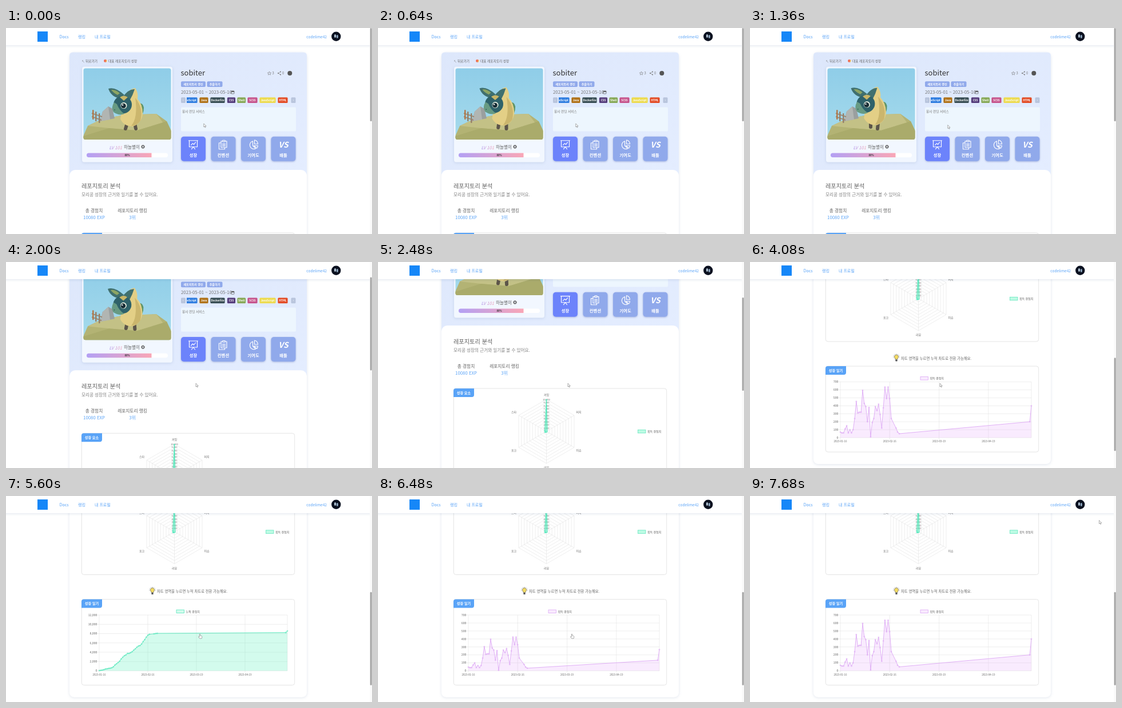
Write an HTML page that moves like this. It is 640 px wide and 360 px high and loops after 7.76 s.

```html
<!DOCTYPE html>
<html lang="ko">
<head>
<meta charset="utf-8">
<style>
html, body { margin: 0; width: 100%; height: 100%; overflow: hidden; background: #fff; }
svg { display: block; width: 640px; height: 360px; font-family: 'Noto Sans CJK KR', 'Noto Sans CJK', 'Noto Sans', sans-serif; font-weight: 300; }
.shadow { filter: drop-shadow(0 1px 2.5px rgba(70, 100, 150, .17)); }
.press { filter: drop-shadow(0 1px 1.5px rgba(60, 80, 160, .35)); }
.line { fill: none; stroke: #fff; stroke-width: 1.15; stroke-linejoin: round; stroke-linecap: round; }
</style>
</head>
<body>
<svg id="stage" viewBox="0 0 640 360"></svg>
<script>
const LOOP = 7760, FRAME = 80;
const BLUE = '#59a3f7', INK = '#606060', GRID = '#e2e2e2';

const rect = (x, y, w, h, r, fill, more = '') =>
  `<rect x="${x}" y="${y}" width="${w}" height="${h}" rx="${r}" fill="${fill}" ${more}/>`;
const text = (x, y, size, str, fill = INK, more = '') =>
  `<text x="${x}" y="${y}" font-size="${size}" fill="${fill}" ${more}>${str}</text>`;
const path = (d, fill, more = '') => `<path d="${d}" fill="${fill}" ${more}/>`;
const dot = (x, y, r, fill, more = '') => `<circle cx="${x}" cy="${y}" r="${r}" fill="${fill}" ${more}/>`;
const line = (x1, y1, x2, y2, color = GRID, w = .6) =>
  `<path d="M${x1} ${y1}L${x2} ${y2}" stroke="${color}" stroke-width="${w}" fill="none"/>`;
const MID = 'text-anchor="middle"', END = 'text-anchor="end"', BOLD = 'font-weight="700"';

const defs = `<defs>
  <linearGradient id="bar"><stop stop-color="#b3a0f4"/><stop offset="1" stop-color="#f9a6b6"/></linearGradient>
  <linearGradient id="lv"><stop stop-color="#a68bea"/><stop offset="1" stop-color="#f2a0b4"/></linearGradient>
  <linearGradient id="sky" x2="0" y2="1"><stop stop-color="#8fcde8"/><stop offset="1" stop-color="#a6dbec"/></linearGradient>
  <linearGradient id="top" x2="1" y2="1"><stop stop-color="#dde7fb"/><stop offset="1" stop-color="#e4edff"/></linearGradient>
  <clipPath id="photo"><rect x="135.500" y="70.500" width="153" height="124.500" rx="3.500"/></clipPath>
  <clipPath id="tags"><rect x="316" y="119" width="180" height="14"/></clipPath>
</defs>`;

function petScene() {
  const fence = [151, 156, 162].map((x, i) => rect(x, 143 + i * 3, 2.5, 17, 1, i ? '#97816a' : '#b07a4e')).join('');
  return `<g clip-path="url(#photo)">
    ${rect(135, 70, 154, 126, 0, 'url(#sky)')}
    ${path('M135 189L143 171 166 160 205 152 263 150 281 163 289 180V196H135Z', '#b3b374')}
    ${path('M143 171L166 160 205 152 263 150 275 166 229 179 180 175Z', '#c3c186')}
    ${path('M135 189L180 175 229 179 281 163 289 180V196H135Z', '#aaab6b')}
    ${path('M164 163L169 146 179 137 186 141 190 158Z', '#9a9f9f')}${path('M169 146L179 137 182 160 164 163Z', '#b1b5b2')}
    ${line(150, 149, 168, 155, '#9b7c61', 1.6)}${line(150, 155, 167, 161, '#9b7c61', 1.6)}${fence}
    <path id="legs" stroke="#5d5549" stroke-width="6" stroke-linecap="round" fill="none"/>
    <g id="pet">
      ${path('M229 134Q238 126 241 138 241 150 233 157Z', '#5f9468')}
      ${path('M207 119Q217 104 226 104 232 113 230 123 239 132 239 149 237 166 222 171 206 171 200 158Z', '#e3cf86')}
      ${path('M226 121Q241 140 235 161 229 170 219 170 231 156 226 121Z', '#cbb66d')}
      ${path('M203 121Q214 105 225 106 222 116 216 126Z', '#40706f')}
      ${path('M200 122Q184 120 179 105 191 101 207 116Z', '#40706f')}
      ${path('M195 116Q187 112 184 107 192 106 199 113Z', '#8da564')}
      <ellipse cx="204" cy="133" rx="16" ry="15.500" fill="#2f626a"/>
      ${path('M189 129Q183 138 188 146 198 153 207 149 198 143 194 132Z', '#679a83')}
      ${path('M199 120Q206 115 213 120L206 126Z', '#c9b667')}
      ${dot(206, 134.500, 5.500, '#e9f1e4')}${dot(205.500, 135, 4.300, '#172d36')}${dot(204, 133.500, 1.200, '#fff')}
      ${dot(190, 142, .8, '#254950')}
    </g>
  </g>`;
}

function bigButton(x, label, fill, icon) {
  return rect(x, 189.7, 43, 43, 5, fill, 'class="press"') +
    `<g transform="translate(${x + 21.5} 203.7)" class="line">${icon}</g>` +
    text(x + 21.5, 225.2, 7.4, label, '#fff', `${MID} ${BOLD}`);
}

function profile() {
  const tags = [
    ['TypeScript', 306, 29, '#2f7de0'], ['Java', 338, 16, '#b07219'], ['Dockerfile', 357, 26, '#384d54'],
    ['CSS', 386.500, 15, '#563d7c'], ['Shell', 404, 15.500, '#87a957'], ['SCSS', 422, 18, '#c6538c'],
    ['JavaScript', 443, 29, '#eddb4f'], ['HTML', 475, 18, '#e34c26']
  ].map(([name, x, w, c]) => rect(x + .4, 121.3, w - .8, 9.7, 1.5, c) + text(x + w / 2, 127.900, 4.6, name, '#fff', `${MID} ${BOLD}`)).join('');
  const soft = '#90a9eb';
  return path('M111 262V48.500Q111 42.500 117 42.500H520Q526 42.500 526 48.500V262Z', 'url(#top)') +
    text(132.500, 60, 5, '↖', '#777') + text(139, 60, 5.7, '뒤로가기') +
    dot(173.500, 57.500, 2.4, '#ee6b52') + path('M171 55L174 58 177 55 176 60Z', '#f4c95c') +
    text(179, 60, 5.7, '대표 레포지토리 성장') +
    rect(133, 67.500, 158, 167, 4, '#f2f7ff', 'class="shadow"') + petScene() +
    text(180.500, 212, 7.5, 'LV 101', 'url(#lv)', 'font-style="italic"') + text(206, 210.500, 7.6, '하늘별이') +
    dot(239.500, 207.500, 2, 'none', 'stroke="#666" stroke-width="1.4"') +
    dot(239.500, 207.500, 3, 'none', 'stroke="#666" stroke-width=".9" stroke-dasharray="1.2 1.156"') +
    rect(141, 218.500, 142, 7.5, 3.7, '#fff') + path('M144.700 218.500H254.500V226H144.700A3.700 3.700 0 0 1 144.700 218.500Z', 'url(#bar)') +
    text(212, 223.800, 4.2, '80%', '#333', `${MID} ${BOLD}`) +
    text(305.500, 82.500, 13, 'sobiter', '#333', 'font-weight="400"') +
    path('M460.500 76L461.400 78.200 463.700 78.300 461.900 79.800 462.500 82 460.500 80.800 458.500 82 459.100 79.800 457.300 78.300 459.600 78.200Z', 'none', 'stroke="#777" stroke-width=".6"') +
    text(465.500, 81.300, 5.8, '3', '#777') +
    line(476, 79, 480, 76.500, '#777') + line(476, 79, 480, 81.500, '#777') +
    dot(476, 79, 1, '#777') + dot(480, 76.500, 1, '#777') + dot(480, 81.500, 1, '#777') +
    text(483, 81.300, 5.8, '0', '#777') + dot(496.300, 79, 4, '#555') +
    rect(306, 93.3, 43, 9.7, 2, soft) + text(327.500, 100, 5.1, '레포지토리 갱신', '#fff', `${MID} ${BOLD}`) +
    rect(351.500, 93.3, 27, 9.7, 2, soft) + text(365, 100, 5.1, '추출하기', '#fff', `${MID} ${BOLD}`) +
    text(306, 115, 7.8, '2023-05-01 ~ 2023-05-16', '#777') +
    rect(394, 110, 5, 5, .7, 'none', 'stroke="#555" stroke-width=".7"') + rect(394, 110, 5, 1.8, 0, '#555') +
    rect(306, 121.3, 8, 9.7, 1.5, '#b9c5dd') + text(310, 127.900, 6, '‹', '#fff', MID) +
    rect(498.500, 121.3, 8, 9.7, 1.5, '#b9c5dd') + text(502.500, 127.900, 6, '›', '#fff', MID) +
    `<g clip-path="url(#tags)">${tags}</g>` +
    rect(306, 138.500, 201, 42, 2, '#edf6fe') + text(308, 147.500, 5.7, '봉사 펀딩 서비스', '#777') +
    bigButton(306, '성장', '#6c83fb', '<path d="M-8-7H8M-7-7V4H7V-7M-3 8L0 4 3 8M-4 1L-1-2 1 0 4-4"/>') +
    bigButton(358.500, '컨벤션', soft, '<path d="M-4-6H-1M3-6H6V5H-4V-6M-1-7.500H3V-5H-1ZM-4-3H-7.500V8H2.500V5M-1.500-1.500H3.500M-1.500.500H3.500M-1.500 2.500H3.500"/>') +
    bigButton(411, '기여도', soft, '<path d="M-1-6A7 7 0 1 0 4 7L-1 2ZM2-8A7 7 0 0 1 8-1H2ZM1 2H8A7 7 0 0 1 6 6.500Z"/>') +
    bigButton(463.500, '배틀', soft, text(0, 5, 13.800, 'VS', '#fff', `${MID} ${BOLD} font-style="italic" stroke="none"`));
}

function box(y, title) {
  return rect(132.300, y, 372.400, 150, 4, '#fff', 'stroke="#dedede" stroke-width=".8"') +
    path(`M132 ${y + 15}V${y + 4}Q132 ${y} 136 ${y}H168V${y + 11}Q168 ${y + 15} 164 ${y + 15}Z`, BLUE) +
    text(150, y + 9.800, 6.2, title, '#fff', `${MID} ${BOLD}`);
}

function legend(x, y, label, fill, stroke) {
  return rect(x, y, 13.500, 5.6, 0, fill, `stroke="${stroke}" stroke-width=".8"`) + text(x + 16.500, y + 4.700, 5, label);
}

function radar() {
  const cx = 294.5, cy = 433, R = 56;
  const at = (i, r) => [cx + r * Math.sin(i * Math.PI / 3), cy - r * Math.cos(i * Math.PI / 3)].map(v => v.toFixed(2));
  const hex = sizes => 'M' + sizes.map((r, i) => at(i, r)).join('L') + 'Z';
  let s = '';
  for (let k = 1; k <= 10; k++) s += path(hex(Array(6).fill(k * R / 10)), 'none', `stroke="${GRID}" stroke-width=".6"`);
  for (let i = 0; i < 6; i++) s += line(cx, cy, ...at(i, R));
  for (let k = 1; k <= 10; k++) {
    const y = cy - k * R / 10;
    s += rect(cx - 6, y - 2, 12, 4, 0, '#fff', 'opacity=".7"') + text(cx, y + 1.500, 4.1, (k * 1000).toLocaleString('en'), '#666', MID);
  }
  s += path(hex([55, 1.5, 1.5, 1.5, 3, 3]), 'rgba(80,240,185,.45)', 'stroke="#58e8bd" stroke-width="1.3"');
  s += dot(...at(0, 55), 1.3, '#58e8bd') + dot(...at(4, 2.5), 1.3, '#58e8bd') + dot(...at(5, 3), 1.3, '#58e8bd');
  const labels = [['커밋', 294.5, 371], ['머지', 351, 401], ['이슈', 351, 468], ['리뷰', 294.5, 498], ['포크', 237.5, 468], ['스타', 237.5, 401]];
  return s + labels.map(([l, x, y]) => text(x, y, 5, l, '#666', MID)).join('');
}

function analysis() {
  const rays = [0, 1, 2, 3, 4, 5, 6].map(i => {
    const a = Math.PI * (1 + i / 6), c = Math.cos(a), n = Math.sin(a);
    return line(256 + 4.5 * c, 535 + 4.5 * n, 256 + 5.7 * c, 535 + 5.7 * n, '#777', .7);
  }).join('');
  return rect(111, 248, 415, 474, 10, '#fff') +
    text(132, 280, 10.2, '레포지토리 분석') + text(132, 293.500, 7.6, '모리콩 성장의 근거와 일기를 볼 수 있어요.', '#808080') +
    text(154, 321.500, 7.7, '총 경험치', INK, MID) + text(154, 333.500, 7.8, '10080 EXP', BLUE, MID) +
    text(221, 321.500, 7.7, '레포지토리 랭킹', INK, MID) + text(221, 333.500, 7.8, '3위', BLUE, MID) +
    box(358, '성장 요소') + radar() + legend(454.500, 430.300, '획득 경험치', '#bdfbe4', '#62e6bd') +
    rays + path('M254 539Q254 537.500 253 536.500A3.500 3.500 0 1 1 259 536.500Q258 537.500 258 539Z', '#f5dc62', 'stroke="#555" stroke-width=".6"') +
    rect(254.300, 539.500, 3.4, 3, .8, '#555') +
    text(264, 539.500, 6.35, '차트 영역을 누르면 누적 차트로 전환 가능해요.', '#666') +
    box(551, '성장 일기') + '<g id="chart"></g>';
}

// Daily experience as [day, value]
const daily = [70, 60, 60, 110, 150, 60, 100, 60, 100, 240, 455, 310, 320, 320, 595, 430, 390, 200, 380, 10, 190,
  240, 390, 340, 420, 290, 120, 375, 635, 490, 635, 490, 240].map((v, d) => [d, v])
  .concat([[35, 120], [36, 70], [37, 50], [119, 200], [120, 400]]);
let sum = 0;
const total = daily.map(([d, v]) => [d, sum += v]);

const charts = {
  daily: { data: daily, left: 158, max: 700, step: 100, label: '획득 경험치', line: '#dda9f4', fill: 'rgba(225,165,250,.22)' },
  total: { data: total, left: 163, max: 12000, step: 2000, label: '누적 경험치', line: '#58e6bc', fill: 'rgba(80,240,185,.25)' }
};

function drawChart(c, grow) {
  const top = 578.5, base = 676, right = 492, day = (right - c.left) / 120;
  const yOf = v => base - v / c.max * (base - top);
  let s = legend(298, 569.500, c.label, c.fill, c.line);
  for (let v = 0; v <= c.max; v += c.step)
    s += line(c.left - 3, yOf(v), right, yOf(v)) + text(c.left - 3.500, yOf(v) + 1.800, 5.2, v.toLocaleString('en'), '#666', END);
  ['01-16', '02-16', '03-19', '04-19'].forEach((d, i) => {
    const x = c.left + i * 31 * day;
    s += line(x, top, x, base + 3) + text(x, 684, 4.5, '2023-' + d, '#666', MID);
  });
  s += line(right, top, right, base);
  const pts = c.data.map(([d, v]) => [c.left + d * day, yOf(v * grow)].map(n => n.toFixed(2)));
  const d = 'M' + pts.join('L');
  return s + path(`${d}L${right} ${base}L${c.left} ${base}Z`, c.fill) +
    path(d, 'none', `stroke="${c.line}" stroke-width=".9"`) +
    pts.map(([x, y]) => dot(x, y, 1, c.fill, `stroke="${c.line}" stroke-width=".6"`)).join('');
}

const header = rect(-5, -5, 650, 35, 0, '#fff', 'class="shadow"') +
  rect(55, 6, 18, 18, 0, '#1687f8') +
  text(93.500, 17.500, 7.1, 'Docs', BLUE) + text(126, 17.500, 7.1, '랭킹', BLUE) + text(155, 17.500, 7, '내 프로필', BLUE) +
  text(561, 17.500, 6.6, 'codelime42', BLUE, END) +
  dot(577.300, 14.800, 8.2, '#0b1120') +
  '<ellipse cx="575.500" cy="14" rx="1.500" ry="3" fill="#b9cbdc"/><ellipse cx="579.300" cy="15" rx="1.500" ry="3" fill="#8fa9c2"/>';

const stage = document.getElementById('stage');
stage.innerHTML = defs + `<g id="page">${rect(111, 42.5, 415, 679.5, 8, '#fff', 'class="shadow"')}${profile()}${analysis()}</g>` +
  header + rect(636, 0, 4, 360, 0, '#fafafa') + rect(636.700, 0, 3, 163, 1.5, '#a5a5a5', 'id="thumb"') +
  `<g id="cursor" stroke="#777" stroke-width=".6" stroke-linejoin="round">
    ${path('M0 0V6L1.400 4.800 2.400 7 3.400 6.500 2.400 4.400H4.300Z', '#fff', 'id="arrow"')}
    ${path('M-.7 0Q0-.8.7 0V2.500L3.300 3.200Q4 3.500 3.800 5L3.200 7.500H-.5L-2.600 4.500Q-2.300 3.500-.7 4.600Z', '#fff', 'id="hand"')}
  </g>`;
const el = id => document.getElementById(id);

// Keys are [time, ...values], joined linearly
function track(keys, t) {
  const i = keys.findIndex(k => k[0] > t);
  if (i < 0) return keys[keys.length - 1].slice(1);
  const a = keys[i - 1], b = keys[i], p = (t - a[0]) / (b[0] - a[0]);
  return a.slice(1).map((v, j) => v + (b[j + 1] - v) * p);
}
const scrollKeys = [[0, 0], [1640, 0], [2480, 137], [3360, 237], [4080, 369], [4160, 370.5]];
const cursorKeys = [[0, 345.8, 167], [1280, 345.8, 167], [1360, 345.8, 169.5], [1600, 332, 212], [4240, 332, 212],
  [4800, 339, 241.5], [7200, 339, 241.5], [7600, 610.5, 42.5]];
const TO_TOTAL = 5225, TO_DAILY = 6240;
const easeOut = p => 1 - (1 - Math.min(1, p)) ** 4;

let shown = '';
function draw(t) {
  const [scroll] = track(scrollKeys, t), [x, y] = track(cursorKeys, t);
  el('page').setAttribute('transform', `translate(0 ${-scroll})`);
  el('thumb').setAttribute('y', scroll * .453);
  el('cursor').setAttribute('transform', `translate(${x} ${y})`);
  const hand = t > 4240 && t < 7360;
  el('hand').style.display = hand ? '' : 'none';
  el('arrow').style.display = hand ? 'none' : '';

  const lift = (1 - Math.cos(t * 2 * Math.PI / 900)) / 2;
  el('pet').setAttribute('transform', `translate(${-lift} ${1 - 2 * lift}) rotate(${-2 * lift} 215 150)`);
  el('legs').setAttribute('d', `M${212 - lift} 166L${209 + 2 * lift} ${176 - 3 * lift}M${225 - lift} 166L${227 - 4 * lift} 176`);

  const kind = t >= TO_TOTAL && t < TO_DAILY ? 'total' : 'daily';
  const grow = t < TO_TOTAL ? 1 : easeOut((t - (kind === 'total' ? TO_TOTAL : TO_DAILY)) / 1000);
  const key = kind + grow;
  if (key !== shown) el('chart').innerHTML = drawChart(charts[kind], grow);
  shown = key;
}

const start = performance.now();
function tick() {
  const t = (performance.now() - start) % LOOP;
  draw(Math.floor(t / FRAME) * FRAME);
  requestAnimationFrame(tick);
}
tick();
</script>
</body>
</html>
```
